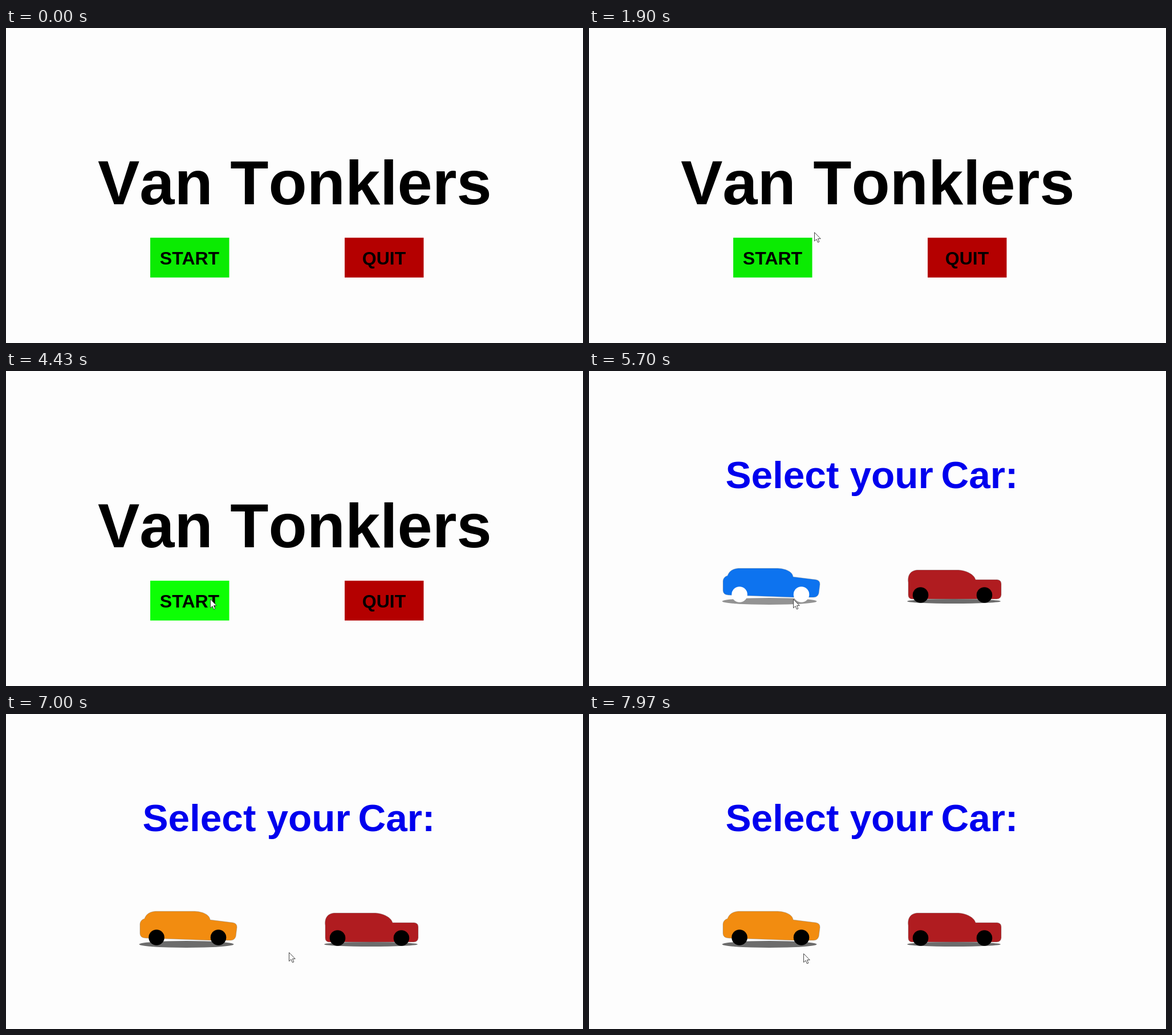
These frames come from a looping animation (1012 px wide and 554 px high, 8 s). An HTML page:

```html
<!DOCTYPE html>
<html lang="en">
<head>
<meta charset="utf-8">
<title>Game menu</title>
<style>
  html, body { margin: 0; width: 100%; height: 100%; overflow: hidden; background: #fdfdfd; }
  svg { display: block; width: 1012px; height: 554px; }
  text { font-family: "Liberation Sans", Arial, sans-serif; font-weight: bold; }
  .title { font-size: 110px; font-kerning: none; }
  .heading { font-size: 67.5px; fill: #0000ee; }
  .label { font-size: 32px; text-anchor: middle; }
  .button rect { width: 138.5px; height: 70px; }
  .start rect { fill: #0beb02; }
  .start.hover rect { fill: #0dff04; }
  .quit rect { fill: #b40000; }
  .quit.hover rect { fill: #ff0000; }
  .shadow { fill: #6c6c6c; }
  .body { stroke: #777; stroke-opacity: .5; stroke-width: .8; }
  .car circle { r: 13.8px; }
  .car.hover { filter: invert(1); }

  /* Hard cut from the menu to the car selection */
  #menu { animation: leave 8s step-end infinite; }
  #garage { animation: enter 8s step-end infinite; }
  #cursor { animation: appear 8s step-end infinite; }
  @keyframes leave { 65% { visibility: hidden; } }
  @keyframes enter { 0% { visibility: hidden; } 65% { visibility: visible; } }
  @keyframes appear { 0% { visibility: hidden; } .375% { visibility: visible; } }
</style>
</head>
<body>
<svg viewBox="0 0 1012 554">
  <g id="menu">
    <text class="title" x="161" y="310">Van Tonklers</text>
    <g class="button start">
      <rect x="253" y="368.8"/>
      <text class="label" x="322" y="416">START</text>
    </g>
    <g class="button quit">
      <rect x="594" y="368.8"/>
      <text class="label" x="663" y="416">QUIT</text>
    </g>
  </g>
  <g id="garage">
    <text class="heading" y="206"><tspan x="239.5">Select</tspan> <tspan x="457.5">your</tspan> <tspan x="617.5">Car:</tspan></text>
    <g class="car">
      <ellipse class="shadow" cx="316.5" cy="405" rx="83" ry="6"/>
      <path class="body" fill="#f28c10" d="M243 360C246 351 254 347 264 347H328C345 347 357 353 358 362L398 367Q405 368 405 375L403 391Q401 398 394 398L358 398 244 394Q235 393 235 386V369Q236 362 243 360Z"/>
      <circle cx="264" cy="393"/>
      <circle cx="372.5" cy="393"/>
    </g>
    <g class="car">
      <ellipse class="shadow" cx="640" cy="405" rx="82" ry="4"/>
      <path class="body" fill="#b01c20" d="M560 372C558 356 567 350 577 350H648C664 351 676 359 678 367H716Q723 368 723 374V394Q722 401 715 401H566Q560 400 560 394Z"/>
      <circle cx="581.5" cy="394"/>
      <circle cx="693.5" cy="394"/>
    </g>
  </g>
  <path id="cursor" d="M.5 .5V15.8L4 12.5 6.4 18 8.8 17 6.5 11.6H11.2Z" fill="#fff" stroke="#444"/>
</svg>
<script>
  const LOOP = 8000, GLIDE = 430;
  const cursor = document.getElementById("cursor");

  // Where the pointer comes to rest, and when it gets there
  const rests = [
    { at: 460, x: 369, y: 359 },
    { at: 1900, x: 395, y: 359 },
    { at: 3200, x: 650, y: 405 },
    { at: 3950, x: 358, y: 401 },
    { at: 6300, x: 373, y: 452 },
    { at: 7200, x: 622, y: 385 },
    { at: 7920, x: 376, y: 421 }
  ];

  const targets = [...document.querySelectorAll(".button, .car")]
    .map(element => ({ element, box: element.getBBox() }));

  // Each glide begins GLIDE ms before its arrival and eases at both ends
  function pointerAt(t) {
    let x = 0, y = 0;
    for (const rest of rests) {
      const p = Math.min(1, Math.max(0, 1 - (rest.at - t) / GLIDE));
      const eased = p * p * (3 - 2 * p);
      x += (rest.x - x) * eased;
      y += (rest.y - y) * eased;
    }
    return [Math.round(x), Math.round(y)];
  }

  const contains = (box, x, y) =>
    x >= box.x && x < box.x + box.width && y >= box.y && y < box.y + box.height;

  function draw(t) {
    const [x, y] = pointerAt(t);
    cursor.setAttribute("transform", `translate(${x} ${y})`);
    for (const { element, box } of targets) {
      element.classList.toggle("hover", contains(box, x, y));
    }
  }

  const animation = cursor.getAnimations()[0];
  function tick() {
    draw((animation.currentTime || 0) % LOOP);
    requestAnimationFrame(tick);
  }
  tick();
</script>
</body>
</html>
```
